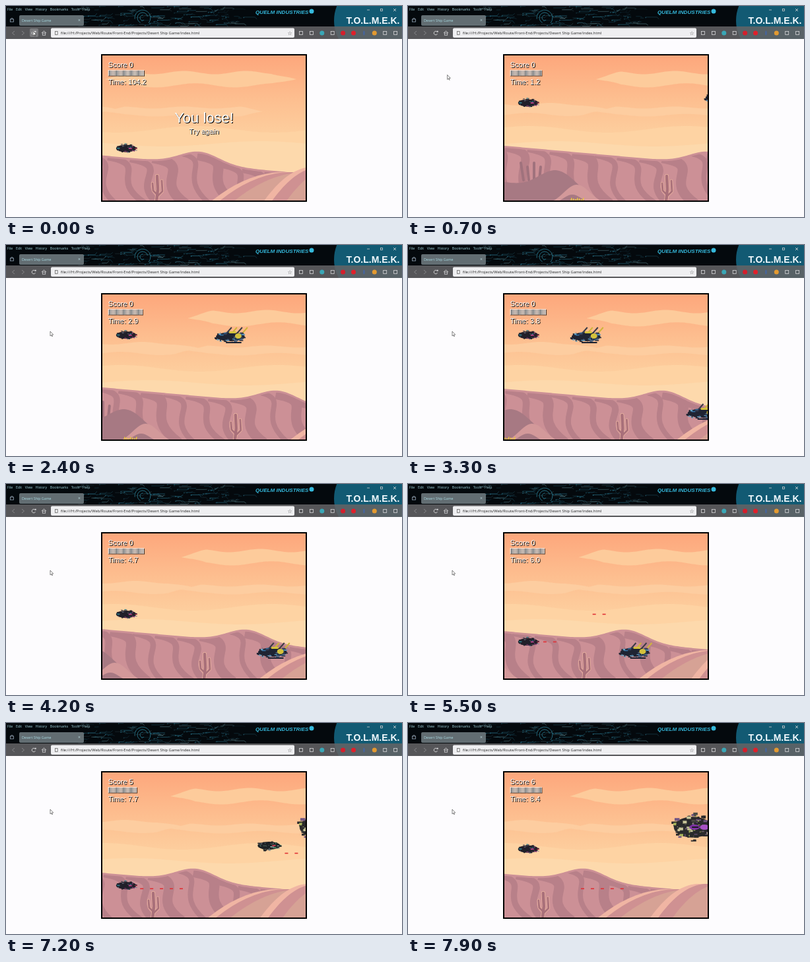
An HTML page with a canvas for the animation above (8 s loop, 600x320 px).

```html
<!DOCTYPE html>
<html lang="en">
<head>
<meta charset="utf-8">
<title>Desert Ship Game</title>
<style>
html, body { margin: 0; width: 100%; height: 100%; overflow: hidden; background: #fdfcfe; }
canvas { display: block; width: 600px; height: 320px; }
</style>
</head>
<body>
<canvas id="stage"></canvas>
<script>
const LOOP = 8000, STEP = 100, RESTART = 200;
const canvas = document.getElementById('stage');
const ratio = window.devicePixelRatio || 1;
canvas.width = 600 * ratio;
canvas.height = 320 * ratio;
const c = canvas.getContext('2d');
c.scale(ratio, ratio);

// ---- helpers ----
const clamp = (v, lo, hi) => Math.min(hi, Math.max(lo, v));
const bump = (x, centre, width) => Math.exp(-(((x - centre) / width) ** 2));

function seeded(seed) {
  return () => (seed = seed * 16807 % 2147483647) / 2147483647;
}
function rect(color, x, y, w, h, r = 0) {
  c.fillStyle = color;
  c.beginPath();
  c.roundRect(x, y, w, h, r);
  c.fill();
}
function frame(color, x, y, w, h) {
  c.strokeStyle = color;
  c.lineWidth = 0.8;
  c.strokeRect(x, y, w, h);
}
function oval(color, x, y, rx, ry = rx) {
  c.fillStyle = color;
  c.beginPath();
  c.ellipse(x, y, rx, ry, 0, 0, 7);
  c.fill();
}
function line(color, width, ...p) {
  c.strokeStyle = color;
  c.lineWidth = width;
  c.beginPath();
  for (let i = 0; i < p.length; i += 2) c.lineTo(p[i], p[i + 1]);
  c.stroke();
}
function ring(color, width, x, y, r, from = 0, to = 7) {
  c.strokeStyle = color;
  c.lineWidth = width;
  c.beginPath();
  c.arc(x, y, r, from, to);
  c.stroke();
}
function text(s, x, y, font, color, align = 'left') {
  c.font = font;
  c.fillStyle = color;
  c.textAlign = align;
  c.fillText(s, x, y);
}
function at(x, y, draw) {
  c.save();
  c.translate(x, y);
  draw();
  c.restore();
}
// Area between two height functions of x
function band(color, from, to, top, bottom = () => 300) {
  c.fillStyle = color;
  c.beginPath();
  for (let x = from; x <= to; x += 3) c.lineTo(x, top(x));
  for (let x = to; x >= from; x -= 3) c.lineTo(x, bottom(x));
  c.fill();
}

// ---- browser window ----
const UI = '"Open Sans", "Noto Sans", sans-serif';
const SANS = '"Liberation Sans", Arial, sans-serif';

function drawTheme() {
  rect('#04090d', 0, 0, 600, 50);
  const rnd = seeded(77);
  for (let i = 0; i < 130; i++) {
    const x = 108 + rnd() * 255, y = rnd() * 31, w = 2 + rnd() * 16;
    const tone = `rgba(${i % 4 ? '45,125,150' : '150,215,228'},${0.2 + rnd() * 0.5})`;
    line(tone, 0.6, x, y, x + w, y, x + w + 3, y + (rnd() - 0.5) * 8);
    if (i % 2) rect(tone, x, y, 1.4, 1.4);
  }
  for (let i = 1; i < 4; i++) ring('#2b7f95', 0.8, 207, 18, i * 4, i, i + 4);
  oval('#125a73', 556, 22, 59);
  text('QUELM INDUSTRIES', 378, 12, `italic bold 8.1px ${SANS}`, '#35b9dc');
  oval('#35b9dc', 463, 8, 3.5);
  text('T.O.L.M.E.K.', 556, 27, `bold 14px ${SANS}`, '#f2fbff', 'center');
}

function drawWindowButtons() {
  line('#ccc', 0.8, 547, 6, 551, 6);
  frame('#ccc', 567.5, 4.5, 3, 3);
  line('#ddd', 0.8, 587, 4, 591, 8);
  line('#ddd', 0.8, 591, 4, 587, 8);
}

function drawToolbar(hover) {
  rect('rgba(100,100,102,.86)', 0, 31, 600, 19);
  const pale = '#d8d8da';
  line('#8c8c8e', 0.9, 13, 38, 9.5, 41, 13, 44);
  line('#8c8c8e', 0.9, 24, 38, 27.5, 41, 24, 44);
  if (hover) rect('#7b7b7e', 36, 34, 13, 13, 2);
  ring(pale, 0.9, 42, 41, 2.8, 0.4, 5.6);
  rect(pale, 43.7, 37.7, 2, 2);
  line(pale, 0.9, 54, 41, 57.5, 38, 61, 41);
  frame(pale, 55.3, 41, 4.4, 3.2);

  rect('#efeff1', 68, 33.5, 369, 14.5, 2);
  frame('#666', 74.5, 38.5, 3.6, 5);
  text('file:///H:/Projects/Web/Route/Front-End/Projects/Desert Ship Game/index.html', 83, 43.2, `5.75px ${UI}`, '#222');
  text('☆', 430, 44, '8px "DejaVu Sans", sans-serif', '#444', 'center');

  const icons = [pale, pale, '#3aa7b6', pale, '#d41f2c', '#e0202b', '#4565a0', '#e39a31', pale, pale];
  icons.forEach((color, i) => {
    const x = 447 + i * 15.9;
    if (color === pale) frame(color, x - 2.5, 38.5, 5, 5);
    else oval(color, x, 41, i === 6 ? 1.2 : 3.5, 3.5);
  });
}

function drawChrome(hover) {
  drawTheme();
  let x = 2;
  for (const word of 'File Edit View History Bookmarks Tools Help'.split(' ')) {
    text(word, x, 6.5, `5.2px ${UI}`, '#a3d6df');
    x += c.measureText(word).width + 4.7;
  }
  rect('rgba(112,124,128,.88)', 20, 14, 98, 16, 2);
  text('Desert Ship Game', 24, 24, `5.3px ${UI}`, '#a9dbe3');
  text('×', 111, 24, `7px ${UI}`, '#b8d8dd', 'center');
  frame('#9ab', 6.5, 20, 5, 4);
  ring('#9ab', 0.7, 9, 20, 1.6, Math.PI, 2 * Math.PI);
  drawWindowButtons();
  drawToolbar(hover);
  rect('#fdfcfe', 0, 50, 600, 270);
}

function drawCursor(x, y) {
  at(x, y, () => {
    c.beginPath();
    c.moveTo(0, 0);
    c.lineTo(0, 7);
    c.lineTo(1.7, 5.6);
    c.lineTo(3.2, 8);
    c.lineTo(2.7, 5.2);
    c.lineTo(4.7, 5);
    c.closePath();
    c.fillStyle = '#fff';
    c.fill();
    c.strokeStyle = '#333';
    c.lineWidth = 0.6;
    c.stroke();
  });
}

// ---- scenery ----
// A long wavy streak, thin at both ends
function cloud(color, x, y, width, height) {
  const thick = p => height / 2 * clamp(Math.sin(Math.PI * (p - x) / width) * 2.5, 0, 1);
  const top = p => y - thick(p) * (0.8 + 0.2 * Math.sin(p / 15));
  const bottom = p => y + thick(p) * (0.75 + 0.25 * Math.cos(p / 19));
  band(color, x, x + width, top, bottom);
}

function drawSky(shift) {
  const sky = c.createLinearGradient(0, 75, 0, 225);
  sky.addColorStop(0, '#fda77c');
  sky.addColorStop(0.45, '#fdbf90');
  sky.addColorStop(1, '#fdd7a6');
  rect(sky, 146, 75, 308, 220);
  at(shift, 0, () => {
    cloud('#fdcb9b', 281, 111, 290, 25);
    cloud('#fdcda0', 0, 157, 300, 20);
    cloud('#fdcda0', 280, 160, 240, 15);
    band('#fed3a3', 0, 700, x => 187 + 5 * Math.sin(x / 38));
    band('#fdd9ac', 0, 700, x => 209 + 4 * Math.sin(x / 47));
  });
}

function drawCactus(x) {
  c.save();
  c.lineCap = c.lineJoin = 'round';
  for (const [color, extra] of [['#ecb5a2', 1.5], ['#a9707a', 0]]) {
    line(color, 4.5 + extra, x - 2, 297, x, 278, x - 1, 258);
    line(color, 2.8 + extra, x - 1, 286, x - 7, 280, x - 8, 269);
    line(color, 2.8 + extra, x, 288, x + 7, 281, x + 6, 265);
  }
  c.restore();
}

const skyline = x => 207 + 0.09 * x - 19 * bump(x, 365, 42);
const rocks = x => 300 - 48 * bump(x, 135, 45) - 33 * bump(x, 40, 60);

function drawDune(x, width, height) {
  const slope = offset => p => 297 - height * (1 - (1 - clamp((p - x - offset) / width, 0, 1)) ** 2);
  band('#f0b5a3', x, 700, slope(0));
  band('#cf9192', x + 9, 700, slope(12));
  band('#d6a295', x + 24, 700, slope(34));
}

function drawHills(shift) {
  at(shift, 0, () => {
    band('#cc9096', -20, 700, skyline);
    c.save();
    c.beginPath();
    for (let x = -20; x <= 700; x += 3) c.lineTo(x, skyline(x) + 3);
    c.lineTo(700, 300);
    c.lineTo(-20, 300);
    c.clip();
    const rnd = seeded(5);
    for (let x = 10; x < 640; x += 34) {
      const y = skyline(x);
      c.strokeStyle = '#b88089';
      c.lineWidth = 7 + rnd() * 9;
      c.beginPath();
      c.moveTo(x - 22, y);
      c.bezierCurveTo(x + 45, y + 12, x - 25, y + 32, x + 20 + rnd() * 25, 300);
      c.stroke();
    }
    c.restore();

    c.lineCap = 'round';
    for (let i = 0; i < 4; i++) line('#a0727d', 4, 80 + i * 10, 238 + i % 2 * 6, 84 + i * 8, 264);
    c.lineCap = 'butt';
    band('#a77983', -20, 240, rocks);
    band('#d3999a', 110, 230, x => 301 - 30 * bump(x, 165, 28), x => 301 - 15 * bump(x, 158, 20));

    drawCactus(302);
    drawDune(382, 110, 45);
    drawDune(462, 75, 53);
  });
}

function drawGrass(x) {
  for (let i = 0; i < 7; i++) line('#e7c63d', 1.5, x - 9 + i * 3, 296, x - 8 + i * 3, 291 + i % 3);
}

// ---- ships, drawn around their centre ----
// Dark hull covered with seeded panels
function hull(seed, rx, ry, dark, panels, count) {
  const rnd = seeded(seed);
  oval(dark, 0, 0, rx * 0.95, ry * 0.75);
  for (let i = 0; i < count; i++) {
    const angle = rnd() * 7, r = Math.sqrt(rnd());
    const w = 1 + rnd() * rx / 4, h = 0.8 + rnd() * ry / 6;
    rect(i % 2 ? dark : panels[(i / 2) % panels.length], Math.cos(angle) * r * rx - w / 2, Math.sin(angle) * r * ry - h / 2, w, h);
  }
}

function player() {
  hull(31, 16, 7.5, '#211f29', ['#4a4b58', '#767a8a', '#2b7f8c', '#8d3a77'], 50);
  rect('#b43f82', 4, -1, 4, 2);
  rect('#a12e48', 13, -0.5, 4, 1.2);
}

function gunship() {
  for (let i = 0; i < 4; i++) line(i % 2 ? '#cfb53a' : '#3c3b46', 2, -6 + i * 8, -4, 2 + i * 8, -13);
  at(0, 1, () => hull(12, 23, 9, '#1f2433', ['#50617a', '#65a5c8', '#39415a', '#3472a5'], 64));
  oval('#d4c13d', 12, 0, 5, 4);
  rect('#d4c13d', -2, -7, 11, 3, 1);
  rect('#1a2030', -7, 9, 24, 2, 1);
}

function fighter() {
  hull(8, 18, 8, '#1c2125', ['#4d9a71', '#69737b', '#3b4a45', '#c6d5cc'], 54);
  rect('#c1394c', 5, -1, 5, 2);
}

function cruiser() {
  hull(19, 30, 21, '#2a2a2c', ['#c9c69a', '#a8b55b', '#735784', '#4b4a45'], 110);
  oval('#7e32a3', 3, 0, 8, 4);
  oval('#a751c4', 18, 0, 7, 4);
  rect('#1a1822', -1, -1, 10, 2);
}

// ---- game rules; times in seconds ----
const RATE = 79, SHOT_SPEED = 84, SHOT_GAP = 0.178, MUZZLE = 198;

// Arrow key presses: start, length; negative lengths move up
const presses = [[1.85, -0.13], [3.43, 0.77], [4.65, 0.53], [5.68, 0.15], [7.14, -0.76]];
const playerY = t => presses.reduce((y, [start, length]) =>
  y + RATE * Math.sign(length) * clamp(t - start, 0, Math.abs(length)), 147);

const burst = (start, count) => Array.from({ length: count }, (_, i) => start + i * SHOT_GAP);
const shots = [...burst(4.35, 2), ...burst(5.24, 3), ...burst(6.07, 7)];

const enemies = [
  { draw: gunship, y: 138, enter: 0.63, speed: 78, gone: 3.9, points: 0, half: [23, 15] },
  { draw: gunship, y: 254, enter: 2.6, speed: 46.4, gone: 6.95, points: 5, half: [23, 15] },
  { draw: fighter, y: 186, enter: 5.47, speed: 46, gone: 7.4, points: 1, half: [18, 8] },
  { draw: cruiser, y: 158, enter: 7.12, speed: 60, gone: 9, points: 0, half: [30, 20] }
];
const enemyX = (e, t) => 478 - e.speed * (t - e.enter);

// Whether a shot fired at the given time has struck an enemy by time t
function hasHit(fired, t) {
  return enemies.some(e => {
    const gap = enemyX(e, fired) - e.half[0] - MUZZLE;
    const meet = fired + gap / (SHOT_SPEED + e.speed);
    return gap > 0 && Math.abs(playerY(fired) - e.y) < e.half[1] && meet <= Math.min(t, e.gone);
  });
}

function ammoAt(t) {
  const fired = shots.filter(s => s <= t).length;
  if (!fired) return Math.min(25, 20 + Math.floor((t + 0.5) / 0.6));
  return Math.min(25, 25 - fired + Math.floor((t - 4.2) / 0.4 + 1e-6));
}

const scoreAt = t => enemies.reduce((sum, e) => sum + (t >= e.gone ? e.points : 0), 0);

function label(s, x, y, size, align) {
  const font = `${size}px ${SANS}`;
  text(s, x + 0.9, y + 0.9, font, '#000', align);
  text(s, x, y, font, '#fff', align);
}

function drawStatus(score, ammo, time) {
  label('Score ' + score, 154.8, 92.6, 11);
  for (let i = 0; i < ammo; i++) {
    const x = 154.8 + i * 2.2;
    rect('#000', x + 0.9, 97.9, 1.32, 8.8);
    rect('#fff', x, 97, 1.32, 8.8);
  }
  label('Time: ' + time, 154.8, 119, 11);
}

function drawLost() {
  drawSky(-131);
  drawHills(-72);
  at(182, 216, player);
  drawStatus(0, 25, '104.2');
  label('You lose!', 300, 177, 22, 'center');
  label('Try again', 300, 194, 11, 'center');
}

function drawPlay(t) {
  drawSky(-5.5 * (t - 1.4));
  drawHills(-26 * (t - 4.2));
  for (const fired of shots)
    if (t >= fired && !hasHit(fired, t))
      rect('#e02f34', MUZZLE + (t - fired) * SHOT_SPEED, playerY(fired) - 0.8, 5, 1.6);
  at(182, playerY(t), player);
  for (const e of enemies) if (t < e.gone) at(enemyX(e, t), e.y, e.draw);
  drawGrass(228 - 40 * (t - 1.4));
  drawStatus(scoreAt(t), ammoAt(t), (t + 0.5).toFixed(1));
}

function render(ms) {
  const lost = ms < RESTART, t = ms / 1000;
  drawChrome(lost);
  rect('#000', 144, 73, 312, 224);
  c.save();
  c.beginPath();
  c.rect(146, 75, 308, 220);
  c.clip();
  if (lost) drawLost();
  else drawPlay(t);
  c.restore();
  const moved = clamp((t - 0.2) / 0.7, 0, 1);
  drawCursor(41 + 26 * moved, 38 + 93 * moved);
}

const start = performance.now();
function tick() {
  const ms = (performance.now() - start) % LOOP;
  render(Math.floor(ms / STEP) * STEP);
  requestAnimationFrame(tick);
}
tick();
</script>
</body>
</html>
```
